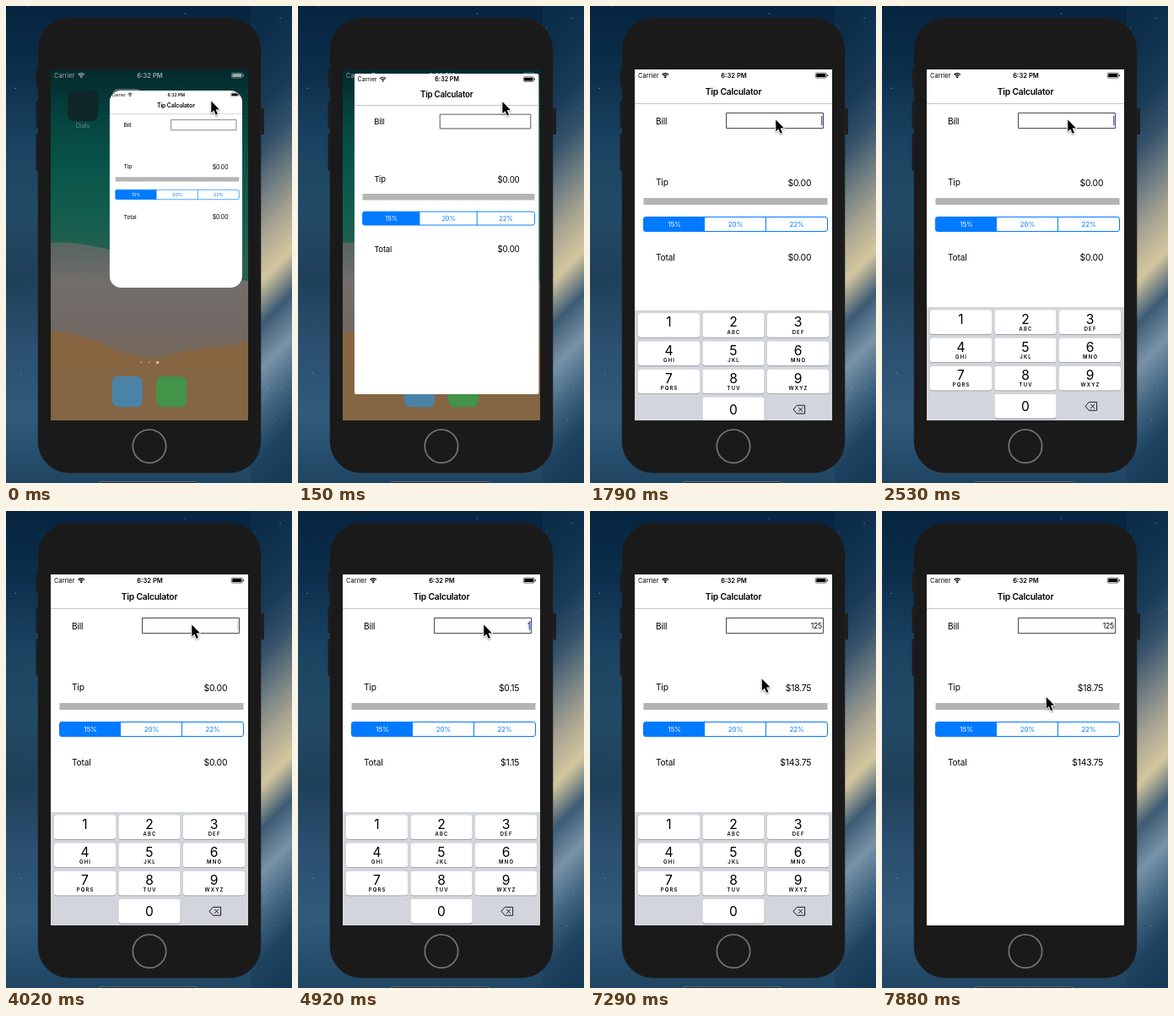
An HTML page with a canvas for the animation above (8000 ms loop, 339 px wide and 564 px high).

```html
<!DOCTYPE html>
<html lang="en">
<head>
<meta charset="utf-8">
<title>Tip Calculator</title>
<style>
html, body { margin: 0; height: 100%; overflow: hidden; background: #1d3f5e; }
canvas { display: block; width: 339px; height: 564px; }
</style>
</head>
<body>
<canvas id="stage"></canvas>
<script>
const W = 339, H = 564, LOOP = 8000, BLUE = '#007aff', KEYS_H = 134;
const SCREEN = { x: 53, y: 75, w: 234, h: 415 };
const canvas = document.getElementById('stage');
const c = canvas.getContext('2d');
const dpr = window.devicePixelRatio || 1;
canvas.width = W * dpr;
canvas.height = H * dpr;

const clamp = v => Math.min(1, Math.max(0, v));
const mix = (a, b, p) => a + (b - a) * p;
const span = (t, from, to) => clamp((t - from) / (to - from));
const easeOut = (p, power) => 1 - (1 - p) ** power;
const smooth = p => p * p * (3 - 2 * p);

function rect(x, y, w, h, fill, r = 0, stroke, line = 1) {
  c.beginPath();
  c.roundRect(x, y, w, h, r);
  if (fill) { c.fillStyle = fill; c.fill(); }
  if (stroke) { c.strokeStyle = stroke; c.lineWidth = line; c.stroke(); }
}

function circle(x, y, r, fill) {
  c.beginPath();
  c.arc(x, y, r, 0, 7);
  c.fillStyle = fill;
  c.fill();
}

// y is the middle of the capitals
function text(s, x, y, size, { color = '#000', weight = 400, align = 'left', track = -.02 * size } = {}) {
  c.font = `${weight} ${size}px Inter, sans-serif`;
  c.letterSpacing = track + 'px';
  c.textAlign = align;
  c.fillStyle = color;
  c.fillText(s, x, y + size * .36);
}

// Evenly spaced colours along a line
function fade(x0, y0, x1, y1, colors) {
  const g = c.createLinearGradient(x0, y0, x1, y1), list = colors.split(' ');
  list.forEach((color, i) => g.addColorStop(i / (list.length - 1), color));
  return g;
}

function sky() {
  rect(0, 0, W, H, fade(0, 0, 0, H,
    '#062440 #0c2f4c #1a4361 #224a66 #1f4059 #2b5070 #315a7b #1f4562'));
  rect(290, 0, 49, H, fade(179, 141, 461, 423,
    '#0c2d49 #10334f #1a3c58 #35526a #6f7d82 #aaa592 #d4c79f #3c5b74 #7893a7 #436782 #1f4462 #173a57'));
  let seed = 7;
  const rnd = () => (seed = seed * 16807 % 2147483647) / 2147483647;
  for (let i = 0; i < 130; i++)
    circle(rnd() * W, rnd() * H, .3 + rnd() * .5, `rgba(190,215,235,${.2 + rnd() * .5})`);
  rect(109, 562.5, 119, 8, '#1b2836', 4, '#5d6b78');
}

function phone() {
  const button = (x, y, h) => rect(x, y, 5, h, '#1c1d1f', 1.5);
  button(35.5, 73, 23);
  button(35.5, 113, 31);
  button(35.5, 151, 44);
  button(301, 121, 31);
  rect(38, 14, 264, 538, '#1a1a1a', 37, '#222325', .6);
  rect(150.3, 500.8, 39.4, 39.4, null, 20, '#717171', 1.8);
}

function statusBar(color) {
  text('Carrier', 57, 82, 7.5, { color, track: 0 });
  text('6:32 PM', 170.5, 82, 7.6, { color, weight: 600, align: 'center', track: 0 });
  c.strokeStyle = color;
  c.lineWidth = 1.2;
  for (const r of [2.9, 5]) {
    c.beginPath();
    c.arc(89.2, 84.6, r, -Math.PI * .77, -Math.PI * .23);
    c.stroke();
  }
  circle(89.2, 84.2, 1.1, color);
  rect(267.3, 79.1, 13, 6, null, 1.5, color, .6);
  rect(268.3, 80.1, 11, 4, color, .7);
  rect(281.2, 81, .9, 2.2, color, .4);
}

function home() {
  const { x, y, w, h } = SCREEN, right = x + w;
  rect(x, y, w, h, fade(0, y, 0, 300, '#03292c #05433d #095449 #125d4e #26614f'));

  // Surf, then sand along a wavy edge
  c.beginPath();
  c.moveTo(x, 280);
  c.bezierCurveTo(110, 275, 180, 310, right, 325);
  c.lineTo(right, 428);
  c.lineTo(x, 428);
  c.fillStyle = fade(0, 280, 0, 428, '#55655f #736e6b #716863 #7b6959');
  c.fill();
  c.beginPath();
  c.moveTo(x, 385);
  c.bezierCurveTo(110, 385, 140, 425, 190, 415);
  c.bezierCurveTo(230, 400, 260, 408, right, 395);
  c.lineTo(right, 430);
  c.lineTo(x, 430);
  c.fillStyle = '#866540';
  c.fill();

  statusBar('#9aa8a8');
  const icon = (ix, iy, color) => rect(ix, iy, 36.3, 36.3, color, 8);
  icon(73.2, 100, '#10272a');
  icon(125.5, 98, '#5b6f6e');
  text('Dials', 91, 141.5, 7.2, { color: '#6f8c88', align: 'center', track: 0 });
  for (let i = 0; i < 3; i++) circle(160 + 9.8 * i, 421.5, 1.8, i < 2 ? '#93805f' : '#c4bdb2');
  rect(x, 428, w, 62, '#846544');
  icon(125.7, 438, '#4b83a8');
  icon(178, 438, '#439349');
}

function backspace() {
  c.beginPath();
  c.moveTo(241, 473.3);
  c.lineTo(245.3, 468.4);
  c.lineTo(254.6, 468.4);
  c.lineTo(254.6, 478.2);
  c.lineTo(245.3, 478.2);
  c.closePath();
  for (const s of [-1, 1]) {
    c.moveTo(247.2, 473.3 - 2.5 * s);
    c.lineTo(252, 473.3 + 2.5 * s);
  }
  c.strokeStyle = '#1c1c1e';
  c.lineWidth = 1;
  c.lineJoin = 'round';
  c.stroke();
}

function keyboard(dy) {
  const labels = ['', 'ABC', 'DEF', 'GHI', 'JKL', 'MNO', 'PQRS', 'TUV', 'WXYZ'];
  const key = (digit, col, row, label) => {
    const x = 57 + 76.5 * col, y = 359.5 + 33.2 * row, mid = x + 36.5;
    rect(x, y + .8, 73, 28.5, '#8d9095', 3);
    rect(x, y, 73, 28.5, '#fff', 3);
    text(digit, mid, y + (digit ? 10.5 : 14.3), 15.6, { align: 'center', track: 0 });
    if (label) text(label, mid + .6, y + 22.3, 5.9, { weight: 600, align: 'center', track: 1.2 });
  };
  c.save();
  c.translate(0, dy);
  rect(SCREEN.x, 356, SCREEN.w, KEYS_H + 6, '#d2d5db');
  labels.forEach((label, i) => key(i + 1, i % 3, Math.floor(i / 3), label));
  key(0, 1, 3);
  backspace();
  c.restore();
}

function caret(t) {
  if (t < 1790 || t > 7560) return 0;
  if (t > 4900 && t < 6050) return 1;
  return clamp(.5 - .9 * Math.cos(2 * Math.PI * (t - 2177) / 1040));
}

function app(t) {
  const { x, y, w, h } = SCREEN;
  const bill = '125'.slice(0, Math.max(0, Math.floor((t - 4920) / 300) + 1));
  const tip = bill * .15;
  const raised = easeOut(span(t, 1650, 1940), 5) - easeOut(span(t, 7460, 7750), 5);
  const amount = (v, at) => text('$' + v.toFixed(2), 262.3, at, 10.4, { align: 'right' });

  rect(x, y, w, h, '#fff');
  statusBar('#000');
  text('Tip Calculator', 170, 101.5, 10.3, { weight: 600, align: 'center' });
  rect(x, 115, w, .8, '#b2b2b2');

  text('Bill', 78, 136, 10.2);
  rect(161.5, 126.5, 115, 18, '#fff', 0, '#4a4a4a');
  text(bill, 275, 136, 8.6, { align: 'right' });
  rect(274, 130, 1.4, 11, `rgba(66,107,242,${caret(t)})`);

  text('Tip', 78, 208.5, 10.2);
  amount(tip, 209);
  rect(63.5, 227, 218, 8, '#b4b4b4');

  rect(63.5, 249.5, 218, 17, '#fff', 2.5, BLUE);
  rect(63.5, 249.5, 72.5, 17, BLUE, [2.5, 0, 0, 2.5]);
  rect(208, 249.5, 1, 17, BLUE);
  ['15%', '20%', '22%'].forEach((s, i) =>
    text(s, 100 + 72.5 * i, 258, 8, { color: i ? BLUE : '#fff', align: 'center' }));

  text('Total', 78, 297, 10.2);
  amount(+bill + tip, 297);
  if (raised > 0) keyboard(KEYS_H * (1 - raised));
}

function appWindow(t) {
  const p = easeOut(span(t, 10, 457), 4);
  const x = mix(122.7, SCREEN.x, p), y = mix(100, SCREEN.y, p);
  const w = mix(157.3, SCREEN.w, p), h = mix(233, SCREEN.h, p);
  if (p < 1) home();
  c.save();
  c.beginPath();
  c.roundRect(x, y, w, h, mix(14, 0, p));
  c.clip();
  c.translate(x, y);
  c.scale(w / SCREEN.w, w / SCREEN.w);
  c.translate(-SCREEN.x, -SCREEN.y);
  app(t);
  c.restore();
}

function pointer(t) {
  let x = 243, y = 112;
  const move = (from, to, toX, toY) => {
    const p = smooth(span(t, from, to));
    x = mix(x, toX, p);
    y = mix(y, toY, p);
  };
  move(10, 457, 239.5, 115);
  move(457, 1050, 220, 134);
  move(6260, 7160, 203.5, 198);
  move(7460, 7900, 194.5, 219.5);

  c.save();
  c.translate(x, y);
  c.lineJoin = 'round';
  const arrow = new Path2D('M.3 .5V14.2L3.4 11.4 5.7 16.7 7.9 15.8 5.6 10.5 9.8 10.3Z');
  c.strokeStyle = '#fff';
  c.lineWidth = 2;
  c.shadowColor = '#0006';
  c.shadowBlur = 2 * dpr;
  c.shadowOffsetY = dpr;
  c.stroke(arrow);
  c.shadowColor = 'transparent';
  c.fillStyle = '#000';
  c.fill(arrow);
  c.restore();
}

function draw() {
  const t = Math.floor((performance.now() % LOOP + 5) / 148.7) * 149 + 10;
  c.setTransform(dpr, 0, 0, dpr, 0, 0);
  sky();
  phone();
  appWindow(t);
  pointer(t);
  requestAnimationFrame(draw);
}
draw();
</script>
</body>
</html>
```
